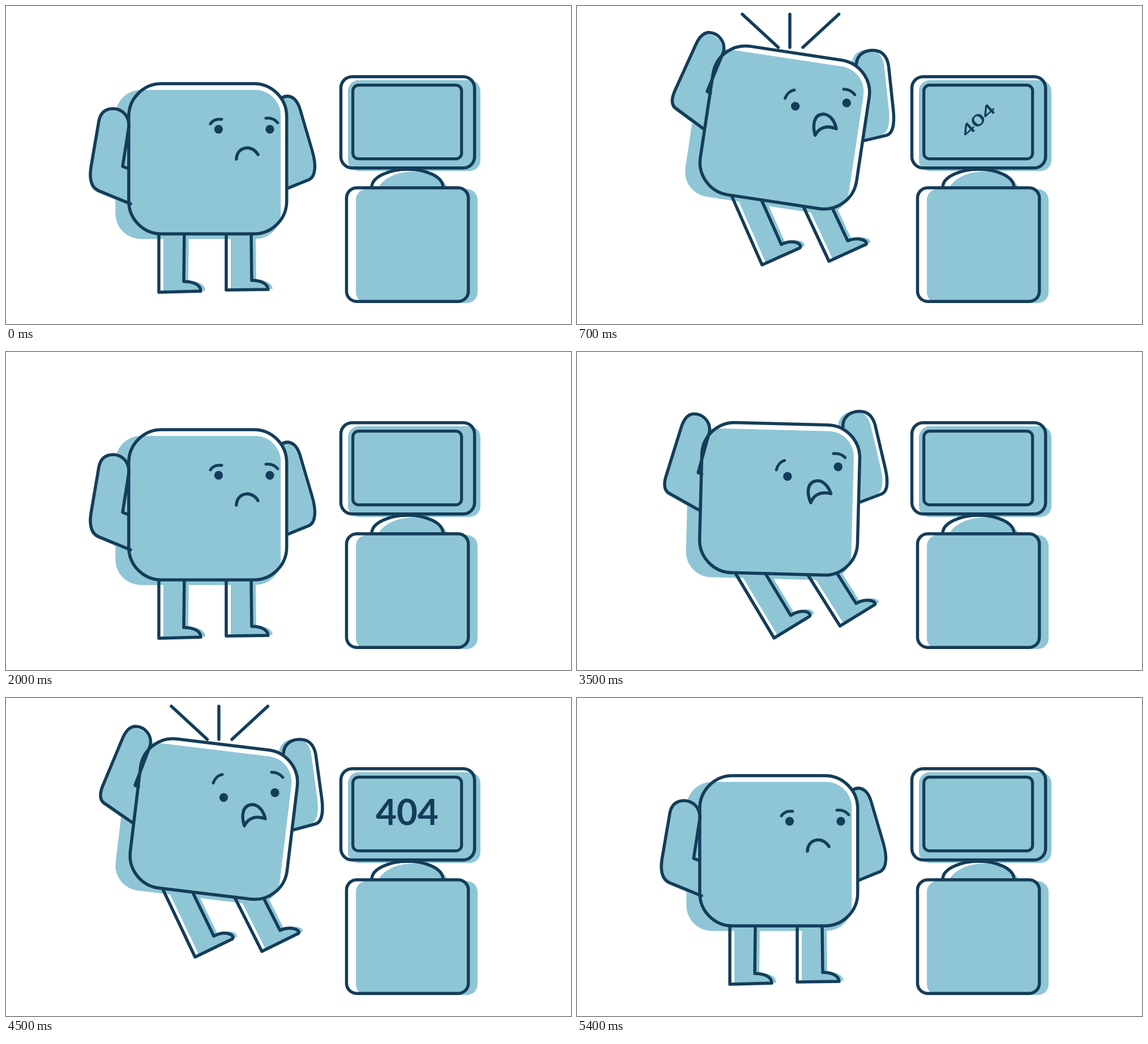
Recreate the animation shown at these times as an HTML page with a canvas. Size 998 by 561 pixels, loop 6830 ms.

```html
<!DOCTYPE html>
<html lang="en">
<head>
<meta charset="utf-8">
<title>404</title>
<style>
html, body { margin: 0; width: 100%; height: 100%; overflow: hidden; background: #fff; }
canvas { display: block; }
</style>
</head>
<body>
<canvas id="stage" width="998" height="561"></canvas>
<script>
const ctx = document.getElementById('stage').getContext('2d');
const INK = '#143d59', BLUE = '#8ec6d6';
const LOOP = 6830, CYCLE = 3400;
const TILT = 6.9;

// Each pose is drawn in its own stage coordinates, around the body centre.
const REST = {
  x: 356.3, y: 269.5, tilt: 0,
  legs: [
    'M270 396L270 505L344 503C344 492 331 486 314 486L315 396',
    'M389 396L389 501L463 500C462 489 449 484 434 484L433 396'
  ],
  legShift: [8, -1],
  left: 'M220 349L164 326C150 320 147 305 150 285L164 203C167 187 177 181 190 181C206 182 218 194 217 213L206 283L214 286',
  leftShift: [-2, 3],
  right: 'M486 163C496 156 511 157 519 181L541 256C548 280 547 300 536 306L494 323',
  rightShift: [-3, 1],
  eyes: [[375.5, 217.5], [466, 217.5]],
  brows: ['M361 208C366 200 374 199 381 200', 'M459 198C468 197 475 200 480 206'],
  mouth: 'M407 270C408 247 435 244 445 262'
};
const JUMP = {
  x: 367, y: 213.5, tilt: TILT,
  legs: [
    'M274 331L334 457L400 425C405 418 388 409 367 420L326 335',
    'M400 344L452 447L517 415C520 408 501 402 484 410L450 343'
  ],
  legShift: [7, -3],
  left: 'M222 219L173 185C165 179 166 168 170 157L206 71C212 57 219 50 229 50C246 51 258 66 255 83L228 154L234 157',
  leftShift: [-2, 3],
  right: 'M490 98C491 80 505 73 519 73C536 73 544 84 547 99L558 179C561 204 557 219 547 222L506 233',
  rightShift: [-8, -1],
  eyes: [[384.5, 175.5], [475, 167]],
  brows: ['M366 150C369 142 375 136 382 135', 'M469 131C478 131 484 134 489 140'],
  mouth: 'M421 225.5C416 210 416 188 436 188C447 189 455 200 458 213C442 207 428 211 421 225.5Z'
};

// time, centre x, centre y, tilt in degrees, brow drop
const KEYS = [
  [100, 358, 259, 1.5, 12],
  [300, 363, 253.5, 5.8, 12],
  [500, 366.5, 237.2, 7.9, 12],
  [700, 367, 214.3, 8.6, 12],
  [900, 367.4, 207, 8.2, 6],
  [1100, 367, 213.5, 6.9, 0],
  [1300, 363, 232, 4.2, 0],
  [1430, 359.5, 246, 2.2, 0],
  [1530, 357.5, 257, 0.8, 0]
];

function slope(i, k) {
  const a = KEYS[Math.max(i - 1, 0)], b = KEYS[Math.min(i + 1, KEYS.length - 1)];
  return (b[k] - a[k]) / (b[0] - a[0]);
}

function track(t, k) {
  let i = 0;
  while (i < KEYS.length - 2 && t >= KEYS[i + 1][0]) i++;
  const a = KEYS[i], b = KEYS[i + 1], d = b[0] - a[0];
  const u = Math.min(1, Math.max(0, (t - a[0]) / d)), v = 1 - u;
  return a[k] * (1 + 2 * u) * v * v + slope(i, k) * d * u * v * v
    + b[k] * u * u * (3 - 2 * u) - slope(i + 1, k) * d * u * u * v;
}

function box(x1, y1, x2, y2, r) {
  const p = new Path2D();
  p.roundRect(x1, y1, x2 - x1, y2 - y1, r);
  return p;
}

function line(path, width = 5.5) {
  ctx.lineWidth = width;
  ctx.stroke(typeof path === 'string' ? new Path2D(path) : path);
}

function fill(path, color = BLUE, shift = [0, 0]) {
  ctx.save();
  ctx.translate(shift[0], shift[1]);
  ctx.fillStyle = color;
  ctx.fill(typeof path === 'string' ? new Path2D(path) : path);
  ctx.restore();
}

function centred(pose) {
  return new DOMMatrix().translate(pose.x, pose.y).rotate(pose.tilt);
}

function placed(path, matrix) {
  const p = new Path2D();
  p.addPath(path, matrix);
  return p;
}

const bodyLine = box(-139.5, -132.5, 139.5, 132.5, 58);
const bodyFill = box(-163, -121.5, 129, 141.5, 45);

function creature(pose, x, y, tilt, browDrop = 0) {
  ctx.save();
  ctx.translate(x, y);
  ctx.rotate((tilt - pose.tilt) * Math.PI / 180);
  ctx.translate(-pose.x, -pose.y);
  const m = centred(pose), outline = placed(bodyLine, m);

  pose.legs.forEach(p => fill(p, BLUE, pose.legShift));
  fill(pose.left, BLUE, pose.leftShift);
  fill(pose.right, BLUE, pose.rightShift);
  fill(outline, '#fff');
  fill(placed(bodyFill, m));

  // Limbs stay behind the body outline.
  ctx.save();
  const outside = new Path2D();
  outside.rect(-500, -500, 2000, 2000);
  outside.addPath(outline);
  ctx.clip(outside, 'evenodd');
  pose.legs.forEach(p => line(p));
  line(pose.right);
  ctx.restore();

  line(pose.left);
  line(outline);
  line(pose.mouth);
  ctx.fillStyle = INK;
  for (const [ex, ey] of pose.eyes) {
    ctx.beginPath();
    ctx.arc(ex, ey, 7.7, 0, Math.PI * 2);
    ctx.fill();
  }
  ctx.translate(0, browDrop);
  pose.brows.forEach(p => line(p, 5));
  ctx.restore();
}

function rays(t) {
  if (t < 300 || t >= 1300) return;
  const dy = Math.max(0, (700 - t) / 50);
  for (const [a, b] of [[292, 355.5], [376, 376], [462.5, 399]])
    line(`M${a} ${14.5 + dy}L${b} ${73 + dy}`);
}

const screenFill = box(604, 131, 838, 291, 19);
const screenLine = box(591.5, 124.7, 827.7, 285.7, 20);
const glass = box(612.7, 139.7, 804.7, 269.7, 10);
const baseFill = box(618, 323, 833, 524, 19);
const baseLine = box(601.5, 320.7, 816.7, 521.2, 18);

function computer() {
  fill('M657 321C668 301 695 292 718 292C745 292 770 302 781 321Z');
  fill(screenFill);
  fill(baseFill);
  line('M646 320C646 300 680 288 709 288C740 288 772 300 772 320');
  line(screenLine);
  line(glass, 5.2);
  line(baseLine);
}

function word(a, b, c, d, dy = 0) {
  ctx.save();
  ctx.transform(a, b, c, d, 708.5, 201.5 + dy);
  ctx.fillText('404', 0, 22.5);
  ctx.restore();
}

function message(t) {
  if (t < 400 || t >= 2000) return;
  ctx.fillStyle = INK;
  ctx.font = '700 63.5px Lato, sans-serif';
  ctx.textAlign = 'center';
  if (t < 600) {
    for (const dy of [-25, 0, 25]) word(1.58, -0.37, 0, 0.3, dy);
  } else if (t < 730) {
    const r = -42.5 * Math.PI / 180, c = Math.cos(r), s = Math.sin(r);
    word(0.65 * c, 0.65 * s, -0.44 * s, 0.44 * c);
  } else {
    word(1, 0, 0, 1);
  }
}

// Two drawings per tenth of a second, 30 ms apart.
function tick(ms) {
  const t = ms % LOOP, u = t < CYCLE ? t : t - CYCLE;
  const base = Math.floor(u / 100) * 100;
  return base + (u - base >= 30 ? 30 : 0);
}

function draw(ms) {
  const t = tick(ms);
  ctx.fillStyle = '#fff';
  ctx.fillRect(0, 0, 998, 561);
  ctx.strokeStyle = INK;
  ctx.lineCap = ctx.lineJoin = 'round';
  computer();
  message(t);
  if (t >= 100 && t < 1600) {
    rays(t);
    creature(JUMP, track(t, 1), track(t, 2), track(t, 3), track(t, 4));
  } else {
    creature(REST, REST.x, REST.y, 0);
  }
}

let start;
function loop(now) {
  if (start === undefined) start = now;
  draw(Math.max(0, now - start));
  requestAnimationFrame(loop);
}
draw(0);
requestAnimationFrame(loop);
</script>
</body>
</html>
```
